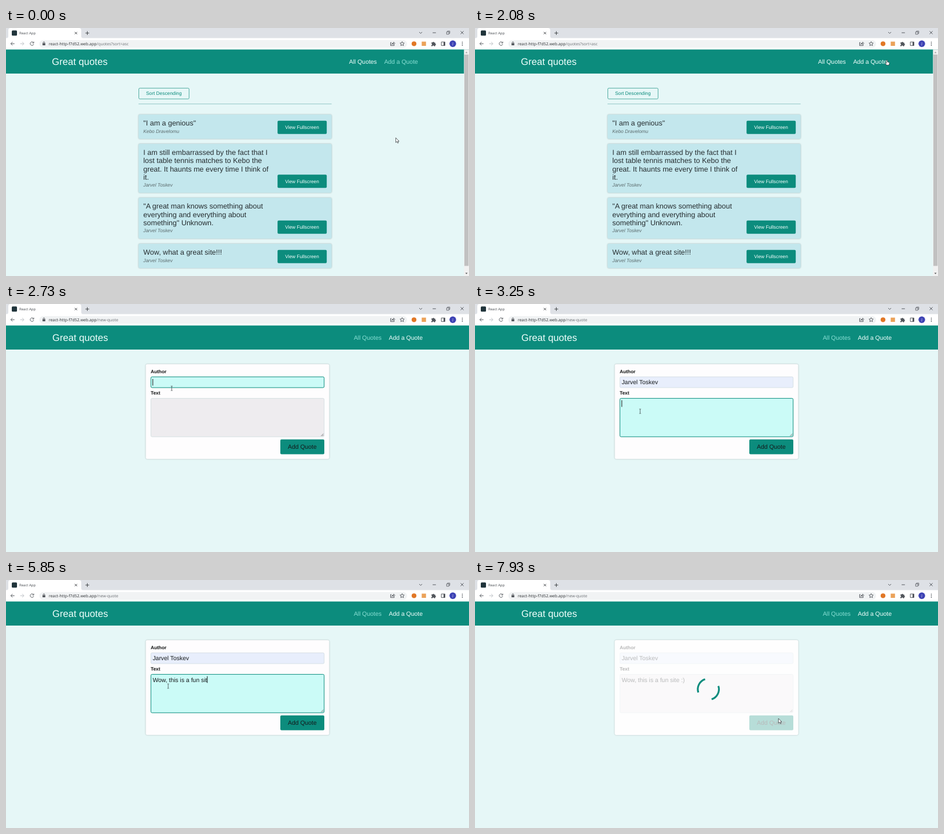
An HTML page that plays this animation: 800 px wide and 430 px high, repeating every 8000 ms.

```html
<!DOCTYPE html>
<html lang="en">
<head>
<meta charset="utf-8">
<title>Great quotes</title>
<style>
  html, body { margin: 0; width: 100%; height: 100%; overflow: hidden; background: #e6f7f7; }
  svg { display: block; width: 800px; height: 430px; }
  text { font-family: "Liberation Sans", Arial, sans-serif; font-size: 8.333px;
         white-space: pre; text-rendering: geometricPrecision; }
  .ui { font-family: "Open Sans", "Noto Sans", sans-serif; }
  .line { fill: none; stroke: #50545a; stroke-width: .95; }
  .title { font-size: 16.667px; fill: #effffc; }
  .nav { font-size: 10.417px; fill: #88dfd4; }
  .nav.on { fill: #f2fffd; }
  .teal { fill: #0c8c7d; }
  .white { fill: #f4fffd; }
  .card { fill: #c3e7ed; }
  .card, .panel { filter: drop-shadow(0 .6px 1.3px rgba(0, 0, 0, .28)); }
  .panel { fill: #fefdfe; }
  .quote { font-size: 12.5px; fill: #262d30; }
  .by { font-style: italic; fill: #5c6b6d; }
  .label { font-weight: bold; fill: #101212; }
  .typed, .add { font-size: 10.417px; fill: #15191b; }
  .field { fill: #eeecef; stroke: #c9d8dc; stroke-width: .7; }
  .field.filled { fill: #e8eefc; }
  .field.focus { fill: #cbfbf7; stroke: #0c8c7d; stroke-width: 1; }
  .button { fill: #0c8c7d; }
  .button.hot { fill: #1fbbaa; }
</style>
</head>
<body>
<svg viewBox="0 0 800 430">
  <rect width="800" height="430" fill="#e6f7f7"/>

  <!-- browser window -->
  <rect width="800" height="18" fill="#dee1e6"/>
  <path d="M0 18Q4 18 4 14V4Q4 0 8 0H126Q130 0 130 4V14Q130 18 134 18Z" fill="#fff"/>
  <rect y="17.5" width="800" height="20" fill="#fff"/>
  <rect x="10" y="4.3" width="9" height="9" rx="1.5" fill="#20343b"/>
  <text class="ui" x="23" y="11" style="font-size:6px" fill="#44484d">React App</text>
  <g class="line">
    <path d="M118.8 6.8l4 4m0-4l-4 4M137.3 8.8h6.4M140.5 5.6v6.4" stroke="#3c4043"/>
    <path d="M714 7l2.5 2.5L719 7M737.2 8.2h5.6M785.5 5.4l5.2 5.2m0-5.2l-5.2 5.2"/>
    <path d="M761.3 6.8h4v4h-4zM762.8 6.4V5.3h4v4h-1" stroke-width=".8"/>
    <path d="M14.7 27.2H8.3m3-3l-3 3 3 3"/>
    <path d="M24.6 27.2H31m-3-3l3 3-3 3" stroke="#bcc0c4"/>
    <path d="M47.3 25.1A3.1 3.1 0 1 0 47.9 28M48 23.7v2.4h-2.4"/>
  </g>
  <rect x="57.5" y="21" width="635.5" height="13" rx="6.5" fill="#f1f3f4"/>
  <rect x="63.1" y="26.2" width="4.8" height="3.9" rx=".5" fill="#55595e"/>
  <path class="line" d="M64.2 26.3v-1a1.3 1.3 0 0 1 2.6 0v1" stroke-width=".7"/>
  <text class="ui" x="74" y="29.9" style="font-size:6.97px" fill="#2a2d31">react-http-f7d52.web.app<tspan id="path" fill="#6b6f74"></tspan></text>
  <g class="line" stroke-width=".8">
    <path d="M666.2 25.2h-1.7v5.2h6.3v-1.5M666.3 28.6q.4-2.7 3.6-2.7v-1.5l2 2.2-2 2.1v-1.4q-2.300-.2-3.600 1.300z"/>
    <path d="M684.500 23.600l1.100 2.300 2.600.3-1.900 1.800.5 2.500-2.300-1.200-2.300 1.200.5-2.500-1.900-1.800 2.600-.3z"/>
    <path d="M752.200 24.200h6.200v6.200h-6.200z"/>
  </g>
  <circle cx="705" cy="27.300" r="4.100" fill="#e17726"/>
  <rect x="718.300" y="23.600" width="7.400" height="7.400" fill="#eba25a"/>
  <path d="M735 25.200h2a1.300 1.300 0 0 1 2.600 0h2v2a1.300 1.300 0 0 1 0 2.600v1.600h-2.200a1.200 1.200 0 0 0-2.400 0H735v-2a1.200 1.200 0 0 0 0-2.400z" fill="#50545a"/>
  <path d="M756 24.200h2.400v6.200H756z" fill="#50545a"/>
  <circle cx="772" cy="27.300" r="5.700" fill="#3d42b4"/>
  <text class="ui" x="772" y="29.400" text-anchor="middle" style="font-size:5.800px" fill="#fff">J</text>
  <g fill="#50545a"><circle cx="788.500" cy="24.500" r=".85"/><circle cx="788.500" cy="27.300" r=".85"/><circle cx="788.500" cy="30.100" r=".85"/></g>

  <!-- site header -->
  <rect class="teal" y="37.300" width="800" height="41.700"/>
  <text class="title" id="title" x="79.200" y="64">Great quotes</text>
  <g id="nav">
    <text class="nav" id="all" x="592.800" y="61.900">All Quotes</text>
    <text class="nav" id="new" x="653.400" y="61.900">Add a Quote</text>
  </g>

  <g id="list">
    <rect x="229.500" y="104.300" width="86.800" height="18.700" rx="1.800" fill="none" stroke="#3fa397" stroke-width=".9"/>
    <text class="teal" x="242" y="116.400">Sort Descending</text>
    <rect x="229" y="131.200" width="333.600" height="1" fill="#93c6c6"/>
    <g id="cards"></g>
    <rect x="791.300" y="37.300" width="8.700" height="393" fill="#f1f1f1"/>
    <rect x="792" y="46" width="7.300" height="366.500" fill="#c1c1c1"/>
    <path d="M793.600 43.500l2-2.400 2 2.400z" fill="#a3a3a3"/>
    <path d="M793.600 424.400l2 2.400 2-2.400z" fill="#505050"/>
  </g>

  <g id="form">
    <rect class="panel" x="241.500" y="104.200" width="317" height="164.600" rx="3"/>
    <text class="label" x="250" y="119.900">Author</text>
    <rect id="author" class="field" x="250.400" y="126.300" width="299.300" height="18.700" rx="2"/>
    <text class="typed" id="name" x="253.400" y="139.200"></text>
    <text class="label" x="250" y="157.200">Text</text>
    <rect id="area" class="field" x="250.400" y="163.600" width="299.300" height="66.600" rx="2"/>
    <path d="M544.300 229l4.200-4.200M546.500 229l2-2" stroke="#555" stroke-width=".7"/>
    <text class="typed" id="words" x="253.400" y="176.500"></text>
    <rect id="caret" width="1" height="11.600" fill="#0a1414"/>
    <rect id="add" class="button" x="474" y="234.700" width="76" height="25.900" rx="2"/>
    <text class="add white" x="487" y="251.200">Add Quote</text>
    <g id="loading">
      <rect x="241.500" y="104.200" width="317" height="164.600" rx="3" fill="#fff" opacity=".7"/>
      <path id="ring" d="M-12.900-12.900A18.250 18.250 0 0 1 12.900-12.900M12.900 12.900A18.250 18.250 0 0 1-12.900 12.900" fill="none" stroke="#0c8c7d" stroke-width="3.100"/>
    </g>
  </g>

  <g id="pointer">
    <path id="arrow" d="M0 0V8.300L2 6.500 3.300 9.300 4.600 8.700 3.400 6H5.700Z" fill="#fff" stroke="#22282a" stroke-width=".7"/>
    <path id="hand" d="M-.9.800Q0-.5.900.800V3.600L3.600 4.300Q4.500 4.700 4.300 5.800L3.600 9H-.8L-2.900 5.900Q-2.700 4.500-.9 6Z" fill="#fff" stroke="#22282a" stroke-width=".7"/>
    <path id="beam" d="M-1.500-3.900H-.5L0-3.500 .5-3.900H1.500M0-3.500V3.500M-1.500 3.900H-.5L0 3.500 .5 3.900H1.500" fill="none" stroke="#333a3b" stroke-width=".75"/>
  </g>
</svg>
<script>
  const LOOP = 8000, STEP = 130;
  const OPEN = 2210, FOCUS = 2600, FILL = 2990, WRITE = 3120, HOVER = 7410, SEND = 7670;
  const AUTHOR = 'Jarvel Toskev', WORDS = 'Wow, this is a fun site :)';
  const $ = id => document.getElementById(id);

  const quotes = [
    [150, 42.3, 'Kebo Dravelomu', '"I am a genious"'],
    [200.8, 85, AUTHOR, 'I am still embarrassed by the fact that I', 'lost table tennis matches to Kebo the',
      'great. It haunts me every time I think of', 'it.'],
    [294.200, 71, AUTHOR, '"A great man knows something about', 'everything and everything about',
      'something" Unknown.'],
    [373.900, 42.300, AUTHOR, 'Wow, what a great site!!!']
  ];

  function card([top, height, by, ...lines]) {
    const first = top + 19.2, pitch = 14.25, end = top + height;
    const row = (s, i) => `<text class="quote" x="237.300" y="${first + i * pitch}">${s}</text>`;
    return `<rect class="card" x="229" y="${top}" width="333.600" height="${height}" rx="2.300"/>
      ${lines.map(row).join('')}
      <text class="by" x="237.300" y="${first + (lines.length - 1) * pitch + 12.400}">${by}</text>
      <rect class="button" x="469.200" y="${end - 31.500}" width="85" height="23" rx="2"/>
      <text class="white" x="482.200" y="${end - 17.200}">View Fullscreen</text>`;
  }
  $('cards').innerHTML = quotes.map(card).join('');

  // time, x, y, pointer shape
  const moves = [
    [0, 673.5, 190.3, 'arrow'], [650, 673.5, 190.3, 'arrow'], [1560, 668, 95, 'arrow'],
    [1690, 672, 70, 'arrow'], [1820, 690, 58, 'hand'], [2080, 711.8, 55.3, 'hand'],
    [2210, 711, 56, 'arrow'], [2600, 293, 137, 'beam'], [2730, 286.3, 146.2, 'beam'],
    [3120, 286, 182, 'beam'], [3250, 285.3, 186, 'beam'], [3380, 280.2, 184, 'beam'],
    [6890, 280.2, 184, 'beam'], [7020, 298, 183.5, 'beam'], [7150, 350, 196, 'beam'],
    [7280, 440, 222, 'beam'], [7410, 520, 245, 'hand'], [7540, 537.3, 250.5, 'hand'],
    [7670, 533, 248, 'arrow'], [7930, 524.3, 240, 'arrow']
  ];
  // time, letters typed
  const typing = [[0, 0], [3510, 0], [3640, 1], [5330, 17], [5460, 18], [5850, 22], [5980, 23],
    [6110, 23], [6240, 24], [6500, 25], [6760, 26]];

  function at(keys, t) {
    let i = keys.length - 1;
    while (keys[i][0] > t) i--;
    const a = keys[i], b = keys[i + 1] || a;
    const k = b === a ? 0 : (t - a[0]) / (b[0] - a[0]);
    return a.map((v, j) => typeof v === 'number' ? v + (b[j] - v) * k : v);
  }

  const show = (id, on) => { $(id).style.display = on ? '' : 'none'; };
  const mark = (id, name, on) => $(id).classList.toggle(name, on);

  function draw(t) {
    const open = t >= OPEN, sent = t >= SEND, writing = t >= WRITE && !sent;
    const naming = t >= FOCUS && t < WRITE;
    show('list', !open);
    show('form', open);
    $('path').textContent = open ? '/new-quote' : '/quotes?sort=asc';
    $('title').setAttribute('x', open ? 80 : 79.2);
    $('nav').setAttribute('transform', `translate(${open ? 8.1 : 0})`);
    mark('all', 'on', !open);
    mark('new', 'on', t >= 1820);

    $('name').textContent = t >= FILL ? AUTHOR : '';
    $('words').textContent = WORDS.slice(0, Math.floor(at(typing, t)[1] + 1e-6));
    mark('author', 'focus', naming);
    mark('author', 'filled', t >= FILL);
    mark('area', 'focus', writing);
    mark('add', 'hot', t >= HOVER && !sent);

    show('caret', naming || writing);
    if (open) {
      const line = $(naming ? 'name' : 'words');
      $('caret').setAttribute('x', 253.2 + line.getComputedTextLength());
      $('caret').setAttribute('y', naming ? 129.9 : 166.8);
    }

    show('loading', sent);
    $('ring').setAttribute('transform', `translate(403.200 189.400) rotate(${117 + (t - 7930) * .3})`);

    const [, x, y, shape] = at(moves, t);
    $('pointer').setAttribute('transform', `translate(${x} ${y})`);
    for (const id of ['arrow', 'hand', 'beam']) show(id, id === shape);
  }

  const start = performance.now();
  function tick() {
    const t = (performance.now() - start) % LOOP;
    draw(Math.floor(t / STEP) * STEP);
    requestAnimationFrame(tick);
  }
  tick();
</script>
</body>
</html>
```
